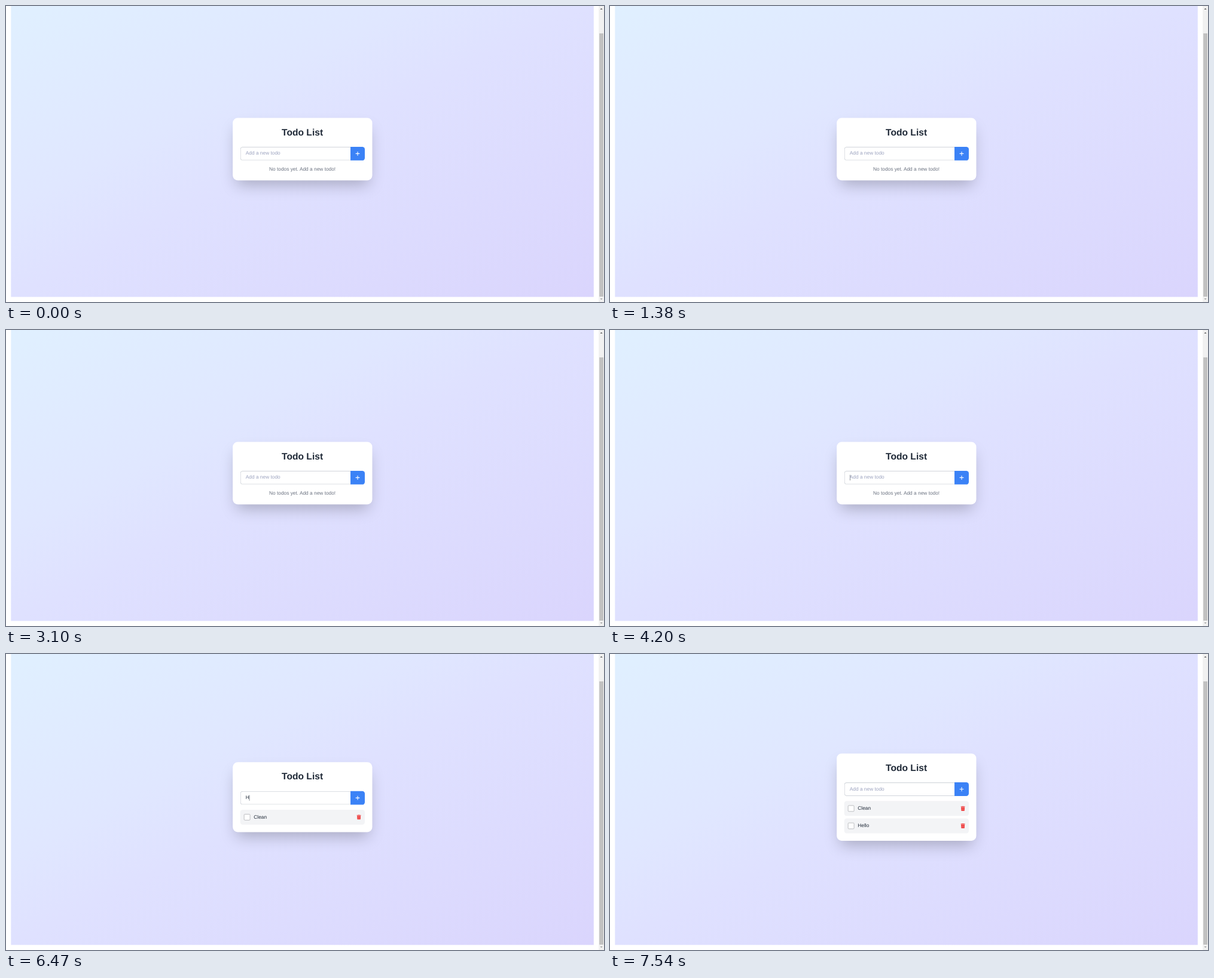
Write an HTML page that moves like this. It is 1000 px wide and 496 px high and loops after 8000 ms.

```html
<!DOCTYPE html>
<html lang="en">
<head>
<meta charset="utf-8">
<title>Todo List</title>
<style>
  html, body { margin: 0; width: 100%; height: 100%; overflow: hidden; background: #fff; }
  * { box-sizing: border-box; }
  svg { display: block; }
  /* laid out at 1920 px wide, shown at 1000 */
  #stage {
    position: absolute; left: 0; top: 0; width: 1920px; height: 953px; overflow: hidden;
    transform: scale(.520833); transform-origin: 0 0;
    font: 16px/24px "Liberation Sans", Arial, sans-serif;
    text-rendering: geometricPrecision; color: #1f2937;
  }
  #page {
    position: absolute; left: 16px; top: -16px; width: 1871px; height: 952px;
    display: flex; align-items: center; justify-content: center;
    background: linear-gradient(to bottom right, #e0f0ff, #e0e7ff 35%, #dfe1ff 50%, #dad5fd);
  }
  #card {
    width: 448px; padding: 24px; border-radius: 16px; background: #fff;
    box-shadow: 0 25px 50px -12px rgba(0, 0, 0, .25);
  }
  #title { margin-bottom: 24px; text-align: center; font-size: 30px; line-height: 45px; font-weight: 700; }
  #form { display: flex; height: 44px; margin-bottom: 16px; }
  #field {
    flex: 1; display: flex; align-items: center; padding: 0 16px;
    border: 2px solid #d1d5db; border-right: 0; border-radius: 8px 0 0 8px;
  }
  #caret { width: 1px; height: 18px; margin-right: -1px; background: #1f2937; }
  #hint { color: #9ca3bf; }
  #add {
    width: 46px; display: flex; align-items: center; justify-content: center;
    background: #3b82f6; border-radius: 0 8px 8px 0;
  }
  #empty { text-align: center; color: #6b7280; }
  .item {
    display: flex; align-items: center; height: 48px; padding: 0 12px;
    background: #f3f4f6; border-radius: 8px;
  }
  .item + .item { margin-top: 8px; }
  .box { width: 20px; height: 20px; border: 1.5px solid #85888e; border-radius: 3px; background: #fff; }
  .label { flex: 1; margin-left: 12px; }
  #bar { position: absolute; left: 1903px; top: 0; width: 17px; height: 953px; background: #f1f1f1; }
  #thumb { position: absolute; left: 2px; top: 88px; width: 13px; height: 847px; background: #c1c1c1; }
</style>
</head>
<body>
<div id="stage">
  <div id="page">
    <div id="card">
      <div id="title">Todo List</div>
      <div id="form">
        <div id="field"><span id="typed"></span><i id="caret"></i><span id="hint">Add a new todo</span></div>
        <div id="add">
          <svg width="14" height="14"><path d="M1 7h12M7 1v12" stroke="#fff" stroke-width="2" stroke-linecap="round"/></svg>
        </div>
      </div>
      <div id="empty">No todos yet. Add a new todo!</div>
      <div id="list"></div>
    </div>
  </div>
  <div id="bar">
    <svg width="17" height="953">
      <path d="M4.5 11L8.5 7L12.5 11z" fill="#505050"/>
      <path d="M4.5 941L8.5 945L12.5 941z" fill="#a3a3a3"/>
    </svg>
    <div id="thumb"></div>
  </div>
</div>
<script>
  const LOOP = 8000;
  const TODOS = ["Clean", "Hello"];

  // [start ms, typed text, caret shown, todo count]
  const STEPS = [
    [0, "", 0, 0],
    [1530, "", 1, 0],
    [2060, "", 0, 0],
    [2590, "", 1, 0],
    [3100, "", 0, 0],
    [3620, "", 1, 0],
    [4300, "C", 1, 0],
    [4430, "Cl", 1, 0],
    [4560, "Cle", 1, 0],
    [4740, "Clea", 1, 0],
    [4920, "Clean", 1, 0],
    [5240, "", 1, 1],
    [5450, "", 0, 1],
    [5970, "", 1, 1],
    [6470, "H", 1, 1],
    [6630, "He", 1, 1],
    [6710, "Hel", 1, 1],
    [6850, "Hell", 1, 1],
    [7020, "Hello", 1, 1],
    [7260, "", 1, 2],
    [7540, "", 0, 2]
  ];

  const el = id => document.getElementById(id);
  const show = (node, on) => { node.style.display = on ? "" : "none"; };

  const trash = `<svg width="14" height="16" fill="#ef4444">
    <path d="M0 1h4l1-1h4l1 1h4v2H0zM1 4h12l-.7 10.6q-.1 1.4-1.5 1.4H3.2q-1.4 0-1.5-1.4z"/>
    <path d="M4.2 6.5v7M7 6.5v7M9.8 6.5v7" stroke="#f38080" stroke-width=".8"/></svg>`;

  el("list").innerHTML = TODOS.map(name =>
    `<div class="item"><div class="box"></div><div class="label">${name}</div>${trash}</div>`).join("");
  const items = document.querySelectorAll(".item");
  let current;

  function render([, typed, caret, count]) {
    el("typed").textContent = typed;
    show(el("hint"), !typed);
    show(el("caret"), caret);
    show(el("empty"), !count);
    items.forEach((item, i) => show(item, i < count));
  }

  const start = performance.now();
  function tick() {
    const t = (performance.now() - start) % LOOP;
    const step = STEPS.findLast(s => s[0] <= t);
    if (step !== current) render(current = step);
    requestAnimationFrame(tick);
  }
  tick();
</script>
</body>
</html>
```
